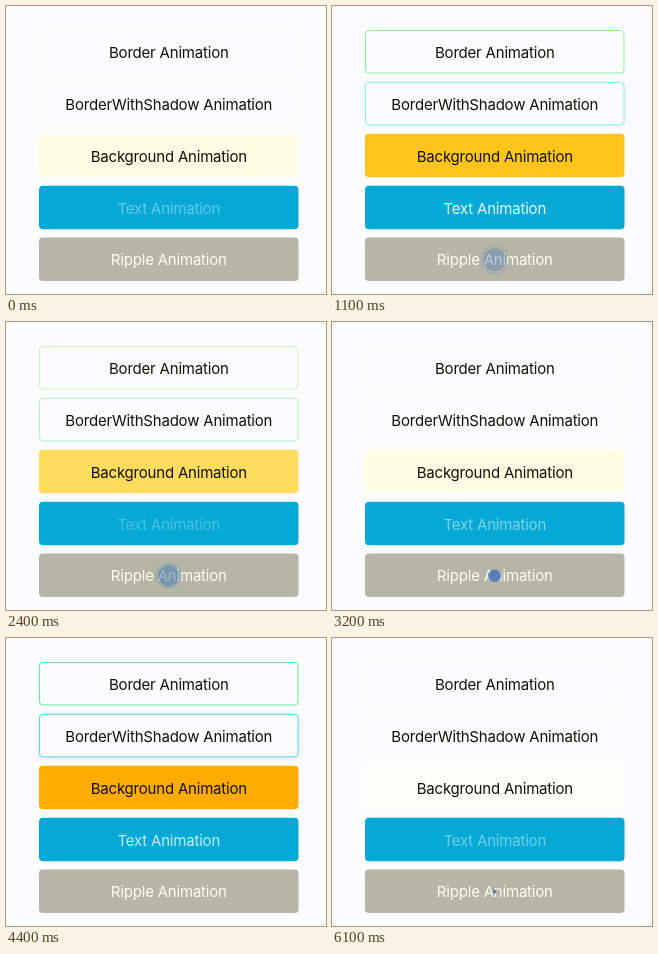
An HTML page for the animation above (6200 ms loop, 320 by 288 pixels).

```html
<!DOCTYPE html>
<html lang="en">
<head>
<meta charset="utf-8">
<title>Button animations</title>
<style>
  html, body { margin: 0; width: 100%; height: 100%; overflow: hidden; background: #fcfcfe; }
  svg { display: block; width: 100%; height: 100%; }
  text { font: 15px Inter, Roboto, sans-serif; letter-spacing: -0.2px; text-anchor: middle; fill: #111108; }
</style>
</head>
<body>
<svg id="stage" viewBox="0 0 320 288">
  <defs>
    <filter id="soft" x="-10%" y="-40%" width="120%" height="180%">
      <feGaussianBlur stdDeviation="3"/>
    </filter>
  </defs>
</svg>
<script>
const LOOP = 6200, CYCLE = 3000, PULSE = 1500;
const stage = document.getElementById('stage');

function set(el, attrs) {
  for (const key in attrs) el.setAttribute(key, attrs[key]);
}
function add(tag, attrs, words) {
  const el = document.createElementNS('http://www.w3.org/2000/svg', tag);
  set(el, attrs);
  if (words) el.textContent = words;
  return stage.appendChild(el);
}

const rowY = row => 24 + row * 51.9;
const box = (row, attrs) => add('rect', { x: 33, y: rowY(row), width: 259.5, height: 43.5, rx: 4, ...attrs });
const outline = row => add('rect', {
  x: 33.5, y: rowY(row) + 0.5, width: 258.5, height: 42.5, rx: 3.5, fill: '#fcfcfe'
});
const label = (row, words, color) => add('text', {
  x: 162.8, y: rowY(row) + 27.8, style: color ? `fill:${color}` : ''
}, words);

const border = outline(0);
label(0, 'Border Animation');

const shadow = box(1, { fill: '#8cc8e0', filter: 'url(#soft)' });
const glowBorder = outline(1);
label(1, 'BorderWithShadow Animation');

const fill = box(2);
label(2, 'Background Animation');

box(3, { fill: '#06a9d5' });
const fadeText = label(3, 'Text Animation', '#f0ffff');

box(4, { fill: '#b5b6a8' });
label(4, 'Ripple Animation', '#ffffec');
const center = { cx: 162.7, cy: 253.7 };
const disc = add('circle', { ...center, fill: '#4a78b4' });
const ring = add('circle', { ...center, fill: 'none', stroke: '#4a78b4', 'stroke-width': 0.8 });

const clamp = (x, low, high) => Math.min(high, Math.max(low, x));
const smooth = u => u * u * (3 - 2 * u);

// Back-and-forth ramp: 0 at the given low time, 1 half a cycle later.
function swing(t, low) {
  const p = ((t - low + CYCLE) % CYCLE) / CYCLE;
  return 1 - Math.abs(1 - 2 * p);
}

// Pale yellow that deepens while its hue turns by `turn` degrees.
const borderColor = (u, turn) =>
  `hsl(${60 + turn * smooth(u)}, 78%, ${99 - 42 * u ** 1.3}%)`;

// White through amber to orange: blue drains first, then green.
const fillColor = u =>
  `rgb(255, ${Math.round(255 - 102 * u ** 1.4)}, ${Math.round(clamp(250 - 335 * u, 0, 255))})`;

function draw(t) {
  const u = swing(t, 100), v = swing(t, 2600);
  set(border, { stroke: borderColor(u, 88) });
  set(glowBorder, { stroke: borderColor(u, 137) });
  set(shadow, { opacity: 0.5 * u * u });
  set(fill, { fill: fillColor(u) });
  set(fadeText, { opacity: 0.2 + 0.75 * v });

  const k = clamp((t % PULSE - 100) / 1300, 0, 1);
  const radius = 12.5 * k ** 0.3, strength = 0.95 * (1 - k) ** 0.6;
  set(disc, { r: radius, opacity: strength });
  set(ring, { r: radius + 2.8 * k, opacity: strength });
}

const start = performance.now();
function tick() {
  draw((performance.now() - start) % LOOP);
  requestAnimationFrame(tick);
}
tick();
</script>
</body>
</html>
```
